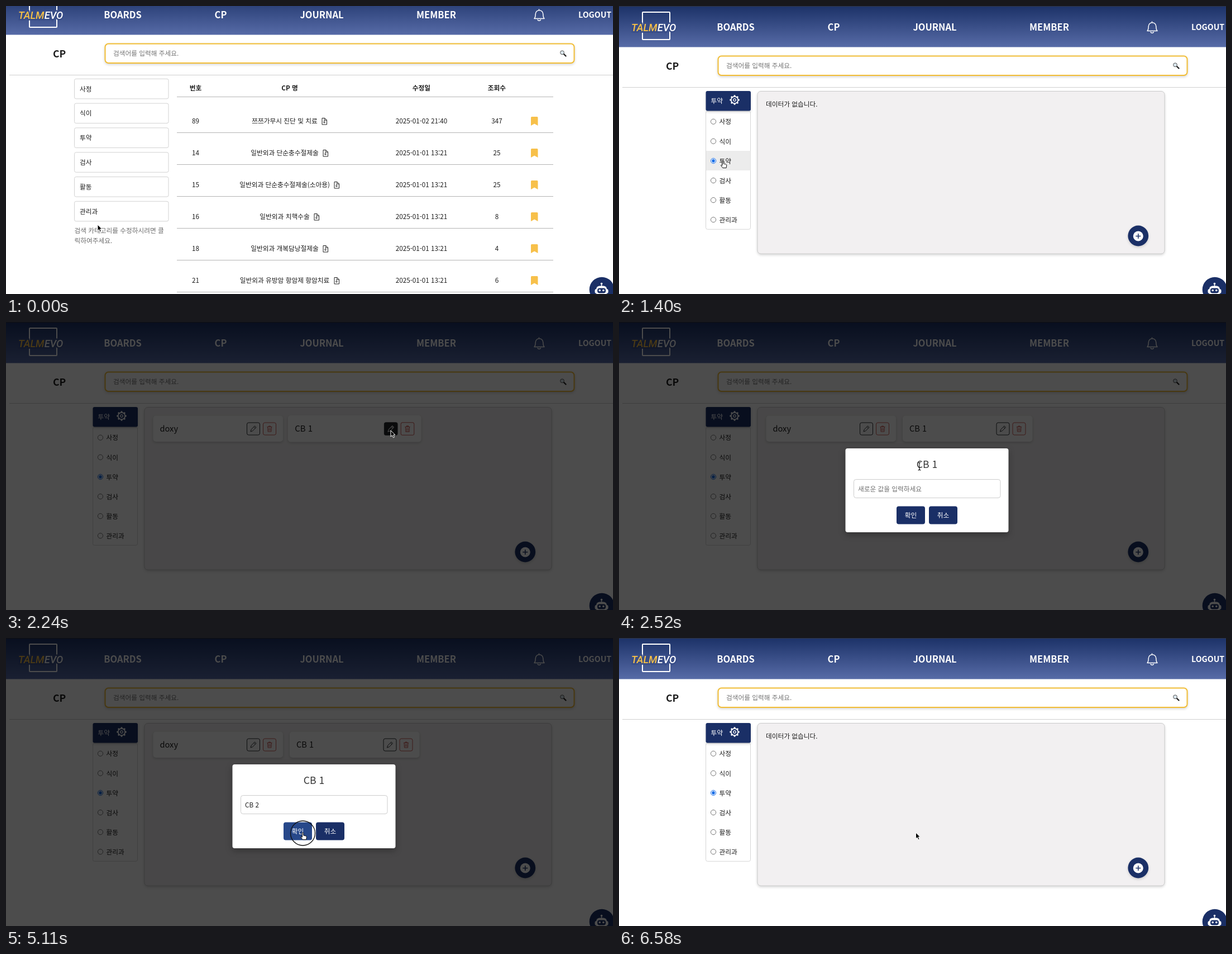
Write an HTML page that moves like this. It is 1087 px wide and 515 px high and loops after 6.65 s.

```html
<!DOCTYPE html>
<html lang="ko">
<head>
<meta charset="utf-8">
<style>
  html, body { margin: 0; width: 100%; height: 100%; overflow: hidden; background: #fff; }
  svg { display: block; width: 1087px; height: 515px; }
  text { font-family: "Noto Sans CJK KR", "Noto Sans CJK", sans-serif; white-space: pre; }
  .raised { filter: drop-shadow(0 2px 2px rgba(0, 0, 0, .16)); }
  .floating { filter: drop-shadow(0 4px 6px rgba(0, 0, 0, .3)); }
</style>
</head>
<body>
<svg id="stage" viewBox="0 0 1087 515"></svg>
<script>
const LOOP = 6650, STEP = 70, NAVY = '#1a2f66', INK = '#1c1c1c';
const CATEGORIES = ['사정', '식이', '투약', '검사', '활동', '관리과'];
const PATHWAYS = [
  [89, '쯔쯔가무시 진단 및 치료', 570, '2025-01-02 21:40', 347],
  [14, '일반외과 단순충수절제술', 572, '2025-01-01 13:21', 25],
  [15, '일반외과 단순충수절제술(소아용)', 592, '2025-01-01 13:21', 25],
  [16, '일반외과 치핵수술', 556, '2025-01-01 13:21', 8],
  [18, '일반외과 개복담낭절제술', 572, '2025-01-01 13:21', 4],
  [21, '일반외과 유방암 항암제 항암치료', 592, '2025-01-01 13:21', 6],
];

// Markup helpers; text is centred vertically on y
const text = (x, y, str, { size = 11.7, weight = 400, fill = INK, anchor = 'start', id = '' } = {}) =>
  `<text id="${id}" x="${x}" y="${y + size * .36}" font-size="${size}" font-weight="${weight}" fill="${fill}" text-anchor="${anchor}">${str}</text>`;
const mid = (x, y, str, opts) => text(x, y, str, { anchor: 'middle', ...opts });
const box = (x, y, w, h, r, fill, rest = '') =>
  `<rect x="${x}" y="${y}" width="${w}" height="${h}" rx="${r}" fill="${fill}" ${rest}/>`;
const circle = (x, y, r, fill, rest = '') => `<circle cx="${x}" cy="${y}" r="${r}" fill="${fill}" ${rest}/>`;
const path = (d, fill, rest = '') => `<path d="${d}" fill="${fill}" ${rest}/>`;
const group = (id, body, rest = '') => `<g id="${id}" ${rest}>${body}</g>`;
const line = (x1, x2, y, color) => path(`M${x1} ${y}H${x2}`, 'none', `stroke="${color}"`);
const at = (x, y) => `transform="translate(${x} ${y})"`;

function header() {
  const nav = { size: 16.5, weight: 700, fill: '#fff' };
  return box(0, 0, 1087, 73.5, 0, 'url(#sky)') + box(0, 0, 1087, 1, 0, '#30343e') +
    box(42, 11, 49, 49, 1, 'none', 'stroke="#fff" stroke-width="2"') +
    `<text x="22" y="44.5" font-size="18.3" font-weight="500" font-style="italic" fill="#f8c146" stroke="#384d88"
      stroke-width="5" paint-order="stroke" style="font-family:Roboto,sans-serif">TALM<tspan fill="#fff">EVO</tspan></text>` +
    mid(209, 38, 'BOARDS', nav) + mid(384.5, 38, 'CP', nav) + mid(565.5, 38, 'JOURNAL', nav) + mid(770.5, 38, 'MEMBER', nav) +
    text(1025, 38, 'LOGOUT', { ...nav, size: 14.2 }) +
    path('M946 44.5c2-2 2.200-4 2.200-8c0-9 13.600-9 13.600 0c0 4 .2 6 2.200 8zM952 46c.5 3 5 3 5.500 0M954.500 29.500v-2', 'none',
      'stroke="#fff" stroke-width="1.5" stroke-linejoin="round"');
}

function searchBar() {
  return text(84, 107.5, 'CP', { size: 17.6, weight: 700 }) +
    box(177.5, 89.5, 840, 34.5, 6, '#fff', 'stroke="#f2bd35" stroke-width="2" class="raised"') +
    text(192, 107, '검색어를 입력해 주세요.', { fill: '#757575' }) +
    path('M998.500 107.500l4 4', 'none', 'stroke="#222" stroke-width="2.4" stroke-linecap="round"') +
    circle(996, 105.3, 3.4, '#dbe7ee', 'stroke="#555"') +
    line(6, 1087, 145.5, '#cfcfcf');
}

function pathwayTable() {
  const bold = { weight: 700 };
  const list = CATEGORIES.map((name, i) => {
    const y = 152.3 + 43.8 * i;
    return box(122.5, y, 168.5, 35.6, 3, '#fff', 'stroke="#d2d2d2"') + text(132, y + 18, name, { weight: 500 });
  }).join('');
  const rows = PATHWAYS.map(([no, name, iconX, date, views], i) => {
    const y = 228 + 57 * i;
    return mid(339.5, y, no) + mid(499, y, name) + mid(744, y, date) + mid(879, y, views) +
      path('M-4-5.500h5l3.500 3.500v8h-8.500zM.8-5.500v3.700h3.700M0-2v5M-2 1.300l2 2l2-2', 'none', at(iconX, y) + ' stroke="#222"') +
      path('M-6-6.500q0-1.500 1.500-1.500h9.500q1.500 0 1.500 1.500v14.500l-6.200-3.500l-6.300 3.500z', '#f7c04a', at(946, y)) +
      line(306, 980, y + 20.5, '#b4b4b4');
  }).join('');
  return list +
    text(122.5, 424, '검색 카테고리를 수정하시려면 클', { fill: '#6c6c6c' }) +
    text(122.5, 441.5, '릭하여주세요.', { fill: '#6c6c6c' }) +
    mid(339.5, 168.5, '번호', bold) + mid(508, 168.5, 'CP 명', bold) + mid(744, 168.5, '수정일', bold) + mid(879, 168.5, '조회수', bold) +
    line(306, 980, 184.5, '#b4b4b4') + rows;
}

function card(id, x, name) {
  const button = (bx, color, icon, bid) =>
    box(bx, 180, 23, 22, 3, '#fff', `stroke="${color}" id="${bid}Box"`) +
    path(icon, 'none', at(bx + 11.5, 191) + ` stroke="${color}" id="${bid}Icon"`);
  return group(id, box(x, 167.5, 232.5, 46.500, 5, '#fff', 'class="raised"') +
    text(x + 12, 191, name, { size: 14.6, weight: 500 }) +
    button(x + 168, '#2a2d31', 'M-5 5l1.200-3.800l6.300-6.300l2.500 2.500l-6.300 6.300zM1-3.500l2.500 2.500', id + 'Edit') +
    button(x + 197, '#cf5a55', 'M-4.500-3.500h9M-1.500-3.500v-1.500h3v1.500M-3.500-3.500l.5 8.500h6l.5-8.500M-1.200-1.500v5M1.200-1.500v5', id + 'Trash'));
}

function categoryPage() {
  const gear = Array.from({ length: 8 }, (_, i) =>
    path('M-1.700-6.500l.5-2.200h2.400l.5 2.200', '#fff', `transform="rotate(${i * 45})"`)).join('');
  const options = CATEGORIES.map((name, i) => {
    const y = 206.7 + 35.1 * i;
    return circle(169, y, 4.600, '#fff', `stroke="#767676" id="radio${i}"`) +
      circle(169, y, 2.800, '#1a6fe8', `id="dot${i}"`) + text(179.5, y + .5, name);
  }).join('');
  return box(155.5, 188, 80, 211.300, 3, '#fff', 'stroke="#d6d6d6"') +
    box(156, 259, 79.5, 35, 0, '#ececec', 'id="hoverRow"') +
    box(155.500, 152, 80.5, 35.500, 3, NAVY, 'class="raised"') +
    text(164.5, 170, '', { fill: '#fff', id: 'current' }) +
    `<g ${at(207, 168)}>${gear}${circle(0, 0, 6.2, 'none', 'stroke="#fff" stroke-width="1.700"')}${circle(0, 0, 2.3, 'none', 'stroke="#fff" stroke-width="1.300"')}</g>` +
    options +
    box(248, 152.500, 729, 290.500, 6, '#f2f0f1', 'stroke="#cbcbcb" class="raised"') +
    group('empty', text(263, 176, '데이터가 없습니다.')) +
    group('cards', card('doxy', 263.5, 'doxy') + card('second', 508, 'CB 1')) +
    circle(929.8, 411, 18.4, NAVY, 'class="raised"') + circle(929.8, 411.5, 9, '#fff') +
    path('M925.300 411.500h9M929.800 407v9', 'none', `stroke="${NAVY}" stroke-width="1.500"`);
}

function chatBot() {
  return circle(1067, 507, 22.3, NAVY) + circle(1066.5, 496.5, 1.800, '#fff') +
    path('M1066.500 497v4', 'none', 'stroke="#fff" stroke-width="1.500"') +
    box(1054.5, 506, 24, 8, 3, '#fff') + box(1057, 500.500, 19, 18, 6, '#fff') +
    box(1059, 504.500, 15, 9, 4, NAVY) + circle(1063.2, 508.5, 1.800, '#fff') + circle(1069.8, 508.5, 1.800, '#fff');
}

function editModal() {
  const label = { weight: 500, fill: '#fff' };
  return box(405.5, 226, 292, 150, 4, '#fff', 'class="floating"') +
    mid(551.5, 255, 'CB 1', { size: 17.6, weight: 500, fill: '#333' }) +
    box(420.5, 281.5, 262.5, 33, 4, '#fff', 'stroke="#cdcdcd"') +
    text(428, 298.5, '', { id: 'entry' }) + box(428, 290, 1, 15, 0, '#222', 'id="caret"') +
    box(497, 329.5, 51, 32, 4, NAVY, 'id="confirm"') + box(555, 329.5, 51, 32, 4, NAVY) +
    mid(522.5, 346, '확인', label) + mid(580.500, 346, '취소', label);
}

function browserAlert() {
  return box(388, -40, 327.500, 118.500, 8, '#1f1f1f', 'class="floating"') +
    text(403, -2.500, 'localhost:5173의 내용:', { size: 11, weight: 500, fill: '#e6e6e6' }) +
    text(403, 18, '수정에 성공하였습니다.', { size: 9, fill: '#f0f0f0' }) +
    box(654, 37.5, 46, 25.500, 12.750, '#a8c7fa') + mid(677, 50, '확인', { size: 9, weight: 500, fill: '#062e6f' });
}

function pointer() {
  const outline = 'stroke-linejoin="round" stroke-width="1"';
  return circle(0, 1, 22, 'none', 'id="ring" stroke="#111" stroke-width="1.300"') +
    group('arrow', path('M0 0v11l2.600-2.300l1.900 4.100l2-.9l-1.900-4h3.400z', '#000', `${outline} stroke="#fff"`)) +
    group('hand', path('M-1 1q0-1.200 1-1.200t1.200 1.200v4l4.300 1q1.500.5 1.300 2l-.7 4.500h-6.300l-3.400-4.500q.5-1.500 2.600.200z', '#fff', `${outline} stroke="#111"`)) +
    group('ibeam', path('M-2.500-7q2.500 0 2.500 2v10q0 2-2.500 2M2.500-7q-2.500 0-2.500 2M2.500 7q-2.500 0-2.500-2M-1.500 2.500h3', 'none', 'stroke="#222" stroke-width="1.200"'));
}

stage.innerHTML =
  `<defs><linearGradient id="sky" x2="0" y2="1"><stop stop-color="#1c3268"/><stop offset="1" stop-color="#576ba7"/></linearGradient></defs>` +
  box(0, 0, 1087, 515, 0, '#fff') +
  group('page', header() + searchBar() + group('table', pathwayTable()) + group('category', categoryPage())) +
  chatBot() + box(0, 0, 1087, 515, 0, '#000', 'id="shade"') +
  group('modal', editModal()) + group('alertBox', browserAlert()) + group('pointer', pointer());

const el = id => document.getElementById(id);
const set = (id, attrs) => { for (const key in attrs) el(id).setAttribute(key, attrs[key]); };
const show = (id, on) => set(id, { visibility: on ? 'inherit' : 'hidden' });
const ramp = (t, from, to) => Math.min(1, Math.max(0, (t - from) / (to - from)));
const ease = p => p * p * (3 - 2 * p);
const pulse = (t, up, upEnd, down, downEnd) => ramp(t, up, upEnd) * (1 - ramp(t, down, downEnd));
const during = (t, ...spans) => spans.some(([from, to]) => t >= from && t < to);
// Latest value whose start time has passed
const latest = (t, steps) => steps.filter(([start]) => t >= start).pop()[1];

const ROUTE = [[0, 164, 391], [560, 164, 391], [1190, 186, 277], [1470, 186, 277], [2030, 689, 194], [2310, 689, 194],
  [2520, 538, 258], [3360, 538, 258], [3640, 500, 298], [4690, 500, 298], [5040, 531.5, 348], [LOOP, 531.5, 348]];
const SHAPES = [[0, 'arrow'], [560, 'hand'], [1540, 'arrow'], [1960, 'hand'], [2170, 'arrow'], [2450, 'ibeam'],
  [3850, ''], [4690, 'ibeam'], [4830, 'arrow'], [4970, 'hand'], [5250, 'arrow']];
const TYPING = [[0, ''], [3850, 'C'], [4060, 'CB'], [4340, 'CB '], [4480, 'CB 2']];

function pointerAt(t) {
  const i = ROUTE.findIndex(([end]) => end > t);
  const [t0, x0, y0] = ROUTE[i - 1], [t1, x1, y1] = ROUTE[i];
  const p = ease(ramp(t, t0, t1));
  return [x0 + (x1 - x0) * p, y0 + (y1 - y0) * p];
}

function draw(t) {
  const [x, y] = pointerAt(t);
  const opened = t >= 490;
  set('page', { transform: `translate(0 ${opened ? 0 : -22})` });
  show('table', !opened);
  show('category', opened);

  const chosen = t < 1400 ? 0 : 2;
  el('current').textContent = CATEGORIES[chosen];
  CATEGORIES.forEach((_, i) => {
    set('radio' + i, { stroke: i === chosen ? '#1a6fe8' : '#767676' });
    show('dot' + i, i === chosen);
  });
  const row = Math.floor((y - 189) / 35.1);
  set('hoverRow', { y: 188.8 + 35.1 * row });
  show('hoverRow', opened && t < 1680 && x > 155 && x < 236);

  const filled = during(t, [1470, 6510]);
  show('cards', filled);
  show('empty', !filled);
  const lift = 1 + .027 * pulse(t, 1750, 1960, 2310, 2450);
  set('second', { transform: `translate(624.200 191) scale(${lift}) translate(-624.200 -191)` });
  const editing = during(t, [1960, 2380]);
  set('secondEditBox', { fill: editing ? '#212529' : '#fff' });
  set('secondEditIcon', { stroke: editing ? '#fff' : '#2a2d31' });

  set('shade', { opacity: .7 * pulse(t, 2030, 2240, 5180, 5320) });
  set('modal', { opacity: pulse(t, 2240, 2450, 5180, 5320) });
  const typed = latest(t, TYPING);
  el('entry').textContent = typed || '새로운 값을 입력하세요';
  set('entry', { fill: typed ? INK : '#6f6f6f' });
  set('caret', { x: 428 + (typed ? el('entry').getComputedTextLength() : 0) });
  show('caret', during(t, [3360, 4690]));
  set('confirm', { fill: during(t, [4970, 5320]) ? '#27488a' : NAVY });

  const drop = ease(ramp(t, 5320, 5600));
  set('alertBox', { opacity: drop * (1 - ramp(t, 6370, 6510)), transform: `translate(0 ${-30 * (1 - drop)})` });

  set('pointer', { transform: `translate(${x} ${y})` });
  const shape = latest(t, SHAPES);
  for (const name of ['arrow', 'hand', 'ibeam']) show(name, name === shape);
  show('ring', during(t, [210, 420], [1190, 1400], [2030, 2170], [5040, 5180]));
}

function tick() {
  const t = performance.now() % LOOP;
  draw(Math.floor(t / STEP) * STEP);
  requestAnimationFrame(tick);
}
tick();
</script>
</body>
</html>
```
